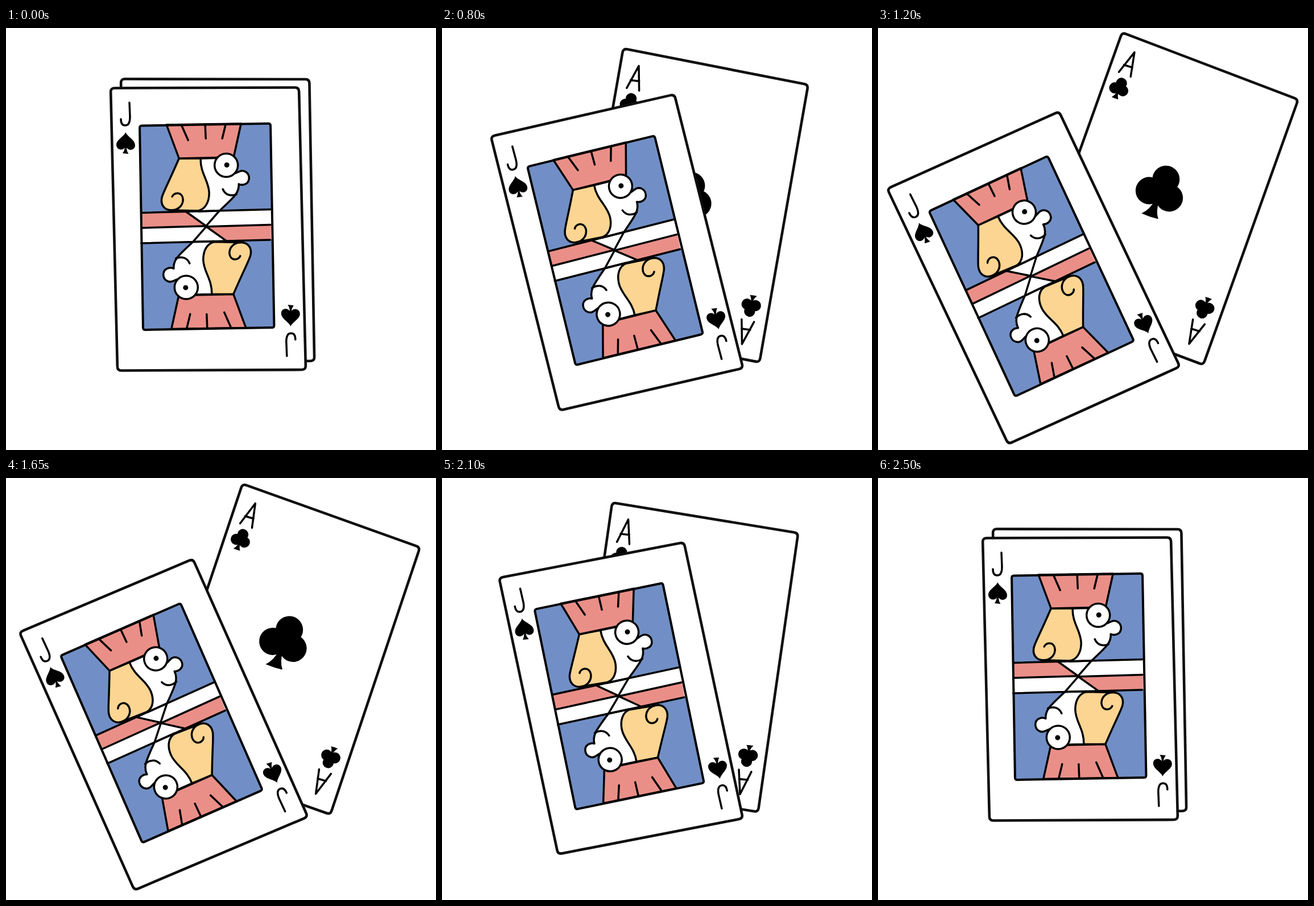
Write an HTML page that moves like this. It is 756 by 741 pixels and loops after 2550 ms.

```html
<!DOCTYPE html>
<html lang="en">
<head>
<meta charset="utf-8">
<title>Two cards</title>
<style>
  html, body { margin: 0; width: 100%; height: 100%; overflow: hidden; background: #fff; }
  svg { display: block; width: 756px; height: 741px; }
  path, circle { stroke-linecap: round; stroke-linejoin: round; }
  .card { fill: #fff; stroke: #0e0e10; stroke-width: 4.6; }
  .line { fill: none; stroke: #000; stroke-width: 3.5; }
  .shape { stroke: #000; stroke-width: 3.5; }
  .white { fill: #fff; }
  .pink { fill: #ea8f88; }
  .hair { fill: #fcd592; }
  .blue { fill: #718fc6; }
</style>
</head>
<body>
<svg viewBox="0 0 756 741">
  <defs>
    <g id="club">
      <circle cx="3" cy="-25" r="24"/>
      <circle cx="-17.5" cy="4" r="24"/>
      <circle cx="20" cy="3.5" r="24"/>
      <path d="M-4 -8H8L5 14Q6 34 15 45Q0 47 -16 46Q-4 34 -2 14Z"/>
    </g>
    <g id="aceCorner">
      <path class="line" d="M221.3 156.4L234.7 114.3L243.6 156.8M225.3 141.5L240.6 140.6"/>
      <use href="#club" transform="translate(231.3 183.4) scale(.405)"/>
    </g>
    <g id="jackCorner">
      <path class="line" d="M217 131L218 156C218 167 214 171 209.500 171C204 171 202 166 202 160"/>
      <path d="M210.500 183C213 191 227 196 227 206C227 214 217 217 212 210Q212 216 215.500 221L205 220Q208 216 209 210C205 216 194 214 194 205C194 196 207 191 210.500 183Z"/>
    </g>
    <g id="portrait" transform="translate(-.8 -1)">
      <path class="shape white" d="M343 230L388 229L404 256L411 253C420 249 429 256 428 266C427 276 416 278 410 275C411 290 403 297 376 322L338 323Z"/>
      <path class="shape hair" d="M305 230L343 230C342 256 358 270 358 291C358 308 350 320 338 322L292 321C278 321 272 310 275 298C277 290 285 276 305 230Z"/>
      <path class="line" d="M293 297C296 289 311 288 312 302C312 313 303 321 292 321"/>
      <path class="shape pink" d="M283 171L414 169L401 228L305 230Z"/>
      <path class="line" d="M309.500 172L321 198M351 171L352 195M387 170L381 195M382 284C386 294 396 297 406 293"/>
      <circle class="shape white" cx="388" cy="242" r="20.500"/>
      <circle cx="389" cy="241.500" r="4.500"/>
      <path class="pink" d="M239 326L318 324L352.700 348.700L239 352Z"/>
      <path class="line" d="M240 325.500L467 319.500M318 324L352.700 348.700L376 322M240 352L352.700 348.700"/>
    </g>
  </defs>

  <g id="ace">
    <path class="card" id="aceEdge"/>
    <use href="#aceCorner"/>
    <use href="#aceCorner" transform="rotate(180 370.300 336.700)"/>
    <use href="#club" transform="translate(362.500 328.300)"/>
  </g>

  <g id="jack">
    <path class="card" id="jackEdge"/>
    <use href="#jackCorner"/>
    <use href="#jackCorner" transform="rotate(180 355.400 353.500)"/>
    <path class="blue" d="M235 172L465 168L472 526L241 530Z"/>
    <path class="white" d="M239 325L466 319L468 373L240 378Z"/>
    <use href="#portrait"/>
    <use href="#portrait" transform="rotate(180 352 348.200)"/>
    <path class="line" id="frameEdge" style="stroke-width:4"/>
  </g>
</svg>
<script>
  const $ = id => document.getElementById(id);

  // Closed polygon with softened corners.
  function rounded(points, r) {
    const toward = (a, b) => {
      const k = r / Math.hypot(b[0] - a[0], b[1] - a[1]);
      return [a[0] + (b[0] - a[0]) * k, a[1] + (b[1] - a[1]) * k];
    };
    const n = points.length;
    return points.map((p, i) => {
      const start = toward(p, points[(i + n - 1) % n]);
      const end = toward(p, points[(i + 1) % n]);
      return `${i ? 'L' : 'M'}${start}Q${p} ${end}`;
    }).join('') + 'Z';
  }

  $('aceEdge').setAttribute('d', rounded([[202, 89.5], [533.3, 90], [542.2, 584.7], [211, 585.5]], 7));
  $('jackEdge').setAttribute('d', rounded([[184, 105.5], [515, 104.5], [527, 600], [196, 601.5]], 7));
  $('frameEdge').setAttribute('d', rounded([[235, 171.5], [465, 167.7], [471.5, 526], [241, 530]], 4));

  const LOOP = 2550, STEP = 50;
  const OPEN_AT = 7, OPEN_STEPS = 17, CLOSE_AT = 32, CLOSE_STEPS = 18;
  const clamp = v => Math.max(0, Math.min(1, v));

  // How far the cards are fanned out, 0 to 1.
  function spread(ms) {
    const n = Math.floor(ms / STEP);
    return clamp((n - OPEN_AT) / OPEN_STEPS) - clamp((n - CLOSE_AT) / CLOSE_STEPS);
  }

  const begin = performance.now();
  function draw() {
    const s = spread((performance.now() - begin) % LOOP);
    $('jack').setAttribute('transform', `rotate(${-24 * s} 516 588.5)`);
    $('ace').setAttribute('transform', `rotate(${20.75 * s} 538.5 669)`);
    requestAnimationFrame(draw);
  }
  draw();
</script>
</body>
</html>
```
